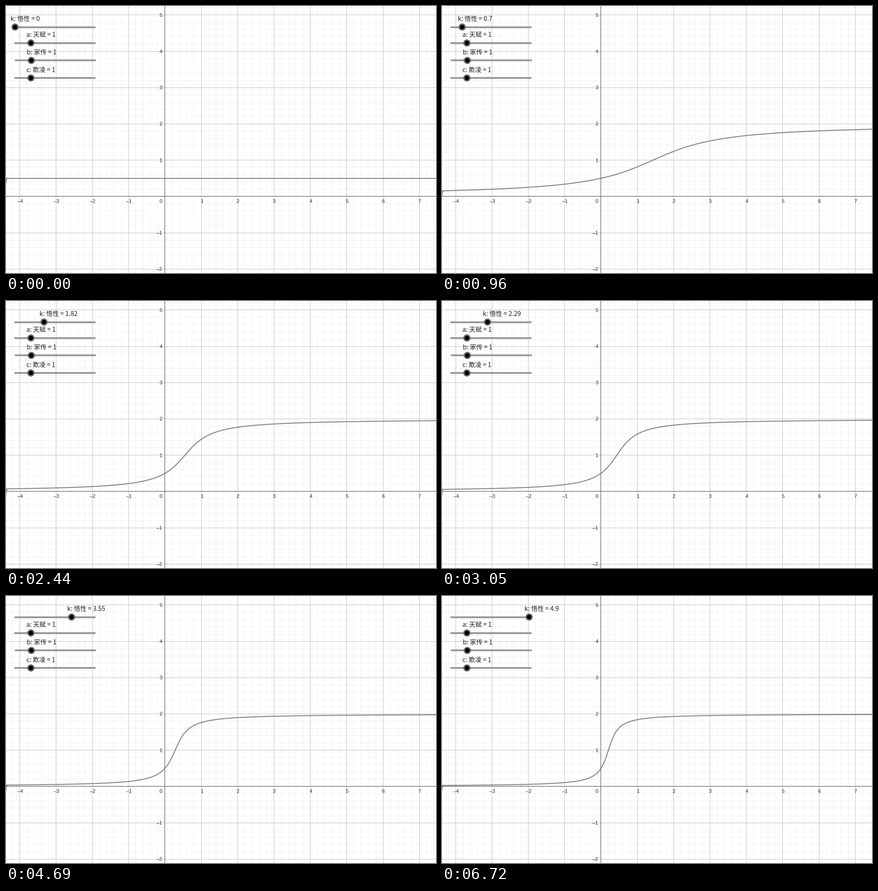
A matplotlib script for the animation above (6.8 s loop, 949 by 590 pixels).

```python
import numpy as np
import matplotlib.pyplot as plt
from matplotlib.animation import FuncAnimation
from matplotlib.collections import LineCollection
from matplotlib.patches import Circle

W, H, DPI = 949, 590, 100
LOOP, TICK = 6800, 40
X0, Y0, UNIT = 350.85, 420.85, 80.2
PX = 72 / DPI
CJK, SANS = "Noto Sans CJK JP", "Liberation Sans"
CURVE = "#616161"

# Redraw times and the step count reached at each
STEP_MS = [0, 90, 810, 1530, 2290, 3050, 3750, 4440, 5160, 5920, 6630, 6720]
STEP_NO = [0, 1, 10, 19, 29, 39, 48, 57, 66, 76, 85, 86]
# Slider travel by step; past K_MAX it bounces back
K_STEP = [0, 12, 31, 48, 60, 75, 86]
K_PATH = [0, 0.7, 1.82, 2.82, 3.55, 4.42, 5.1]
K_MAX = 5

fig = plt.figure(figsize=(W / DPI, H / DPI), dpi=DPI, facecolor="white")
ax = fig.add_axes([0, 0, 1, 1])
ax.set_xlim(0, W)
ax.set_ylim(H, 0)
ax.axis("off")


def sx(x):
    return X0 + UNIT * x


def sy(y):
    return Y0 - UNIT * y


def crisp(v):
    return np.floor(v) + 0.5


def rules(xs, ys, color, z):
    segs = [[(crisp(sx(x)), 0), (crisp(sx(x)), H)] for x in xs]
    segs += [[(0, crisp(sy(y))), (W, crisp(sy(y)))] for y in ys]
    ax.add_collection(LineCollection(segs, colors=color, linewidths=PX,
                                     snap=False, zorder=z))


def text(x, y, s, size, font, color="#222222", ha="left", z=6):
    return ax.text(x, y, s, fontsize=size * PX, family=font, color=color,
                   ha=ha, va="baseline", zorder=z)


def signed(n):
    return f"\u2013{-n}" if n < 0 else str(n)


class Slider:
    def __init__(self, name, x, y, label_y, value):
        self.name, self.x = name, x
        ax.plot([x, x + 176], [y, y], color="#999999", lw=4 * PX,
                solid_capstyle="round", zorder=4)
        self.knob = [
            Circle((x, y), 7.2, fc="#8c8c8c", ec="#333333", lw=PX, zorder=5),
            Circle((x, y), 5.2, fc="black", ec="none", zorder=5.1),
        ]
        for c in self.knob:
            ax.add_patch(c)
        self.label = text(x, label_y, "", 14, CJK)
        self.set(value)

    def set(self, value):
        x = self.x + 35.15 * value
        for c in self.knob:
            c.center = (x, c.center[1])
        self.label.set_x(x - 10)
        self.label.set_text(f"{self.name} = {value:g}")


rules(np.arange(-22, 38) / 5, np.arange(-11, 27) / 5, "#f0f0f0", 1)
rules(range(-4, 8), range(-2, 6), "#c0c0c0", 2)
rules([0], [0], "#404040", 3)

for n in range(-4, 8):
    if n:
        text(sx(n) + 0.7, 435, signed(n), 11, SANS, ha="center")
text(344.5, 435, "0", 11, SANS, ha="right")
for n in range(-2, 6):
    if n:
        text(344.5, sy(n) + 4, signed(n), 11, SANS, ha="right")

k_slider = Slider("k: 悟性", 20, 46.5, 33, 0)
Slider("a: 天赋", 19.8, 81.7, 68, 1)
Slider("b: 家传", 20.7, 120.3, 107, 1)
Slider("c: 欺凌", 19.8, 159, 146, 1)

xs = np.linspace(-4.45, 7.55, 900)
curve, = ax.plot([], [], color=CURVE, alpha=0.75, lw=2.2 * PX, zorder=3.5)
tag = text(2.5, 0, "f", 14, CJK, CURVE, "right", 3.5)


def f(x, k):
    return 1 + 2 / np.pi * np.arctan(k * x - 1)


def k_at(ms):
    step = np.floor(np.interp(ms, STEP_MS, STEP_NO) + 1e-6)
    k = np.interp(step, K_STEP, K_PATH)
    return round(float(K_MAX - abs(K_MAX - k)), 2)


def update(i):
    k = k_at(i * TICK + 30)
    k_slider.set(k)
    curve.set_data(sx(xs), sy(f(xs, k)))
    tag.set_y(sy(f(-X0 / UNIT, k)) + 11.5)
    return curve, tag, k_slider.label, *k_slider.knob


anim = FuncAnimation(fig, update, frames=LOOP // TICK, interval=TICK,
                     repeat=True, repeat_delay=0, blit=False)
plt.show()
```
